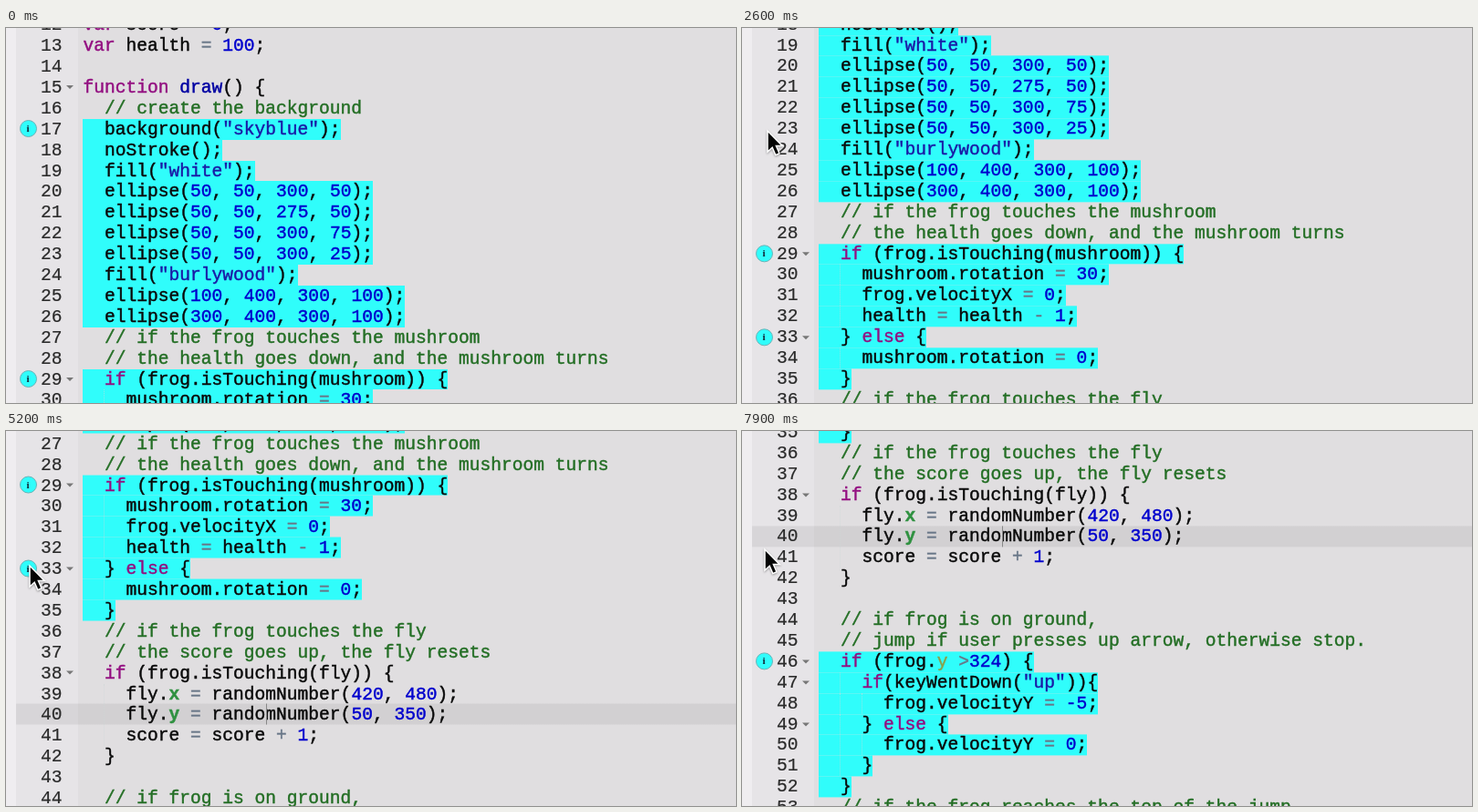
Recreate the animation shown at these times as an HTML page. Size 800 px wide and 412 px high, loop 8000 ms.

```html
<!DOCTYPE html>
<html lang="en">
<head>
<meta charset="utf-8">
<title>Code walkthrough</title>
<style>
html, body { margin: 0; width: 100%; height: 100%; overflow: hidden; }
#stage { position: relative; width: 800px; height: 412px; overflow: hidden;
  background: linear-gradient(90deg, #efedf0 11px, #e6e4e7 11px 79px, #e0dee0 79px);
  font: 19.6px "Liberation Mono", monospace; color: #0a0a0a; white-space: pre; }
#doc, #tip, #cursor { position: absolute; left: 0; top: 0; }
.row { position: absolute; left: 11px; width: 789px; height: 22.9px; line-height: 24.9px; }
.row > * { position: absolute; top: 0; }
.active { background: linear-gradient(90deg, #d7d5d8 68px, #d2d0d2 68px); }
.num { right: 738.5px; color: #2a2a2a; -webkit-text-stroke: .2px; }
.code { left: 73.4px; height: 22.95px; -webkit-text-stroke: .45px; }
.hl { background: #30fdfb; }
.fold { left: 55px; top: 9.5px; border: 4px solid transparent; border-top: 4.5px solid #777; border-bottom: 0; }
.info { left: 3.5px; top: 1.5px; width: 17px; height: 17px; border: 1px solid #68b4b8; border-radius: 50%;
  background: #30fdfb; font: bold 11px/17px "Liberation Serif", serif; text-align: center; color: #123; }
.guide { width: 0; height: 22.9px; border-left: 1px dotted rgba(205, 215, 215, .6); }
.caret { left: 274px; width: 1px; height: 22.9px; background: #888; }
.k { color: #930f80; } .n { color: #0000cd; } .s { color: #1a1aa6; } .c { color: #236e24; }
.o { color: #687687; } .f { color: #0000a2; } .p { color: #2f9140; font-weight: bold; }
.hl .p { color: #8aa04a; font-weight: normal; }
#tip { box-sizing: border-box; height: 40px; padding: 0 9px 0 41px; border-radius: 7px; background: #2b2a30;
  box-shadow: 0 1px 5px rgba(0, 0, 0, .45); color: #fff; line-height: 42px; -webkit-text-stroke: .35px; }
#tip::before { content: ""; position: absolute; left: 8px; top: 9px; width: 22px; height: 22px;
  border-radius: 50%; background: #e6f3f4; }
#cursor { overflow: visible; filter: drop-shadow(0 1px 1px rgba(0, 0, 0, .35)); }
</style>
</head>
<body>
<div id="stage">
  <div id="doc"></div>
  <div id="tip"></div>
  <svg id="cursor" width="20" height="30">
    <path d="M0 0V23L5.2 18.2L8.8 26.6L13 24.8L9.4 16.6H16.4Z" fill="#050505" stroke="#fff" stroke-width="1.5"/>
  </svg>
</div>
<script>
const firstLine = 12, rowHeight = 22.9, charWidth = 11.76, loop = 8000;
const source = `var score = 0;
var health = 100;

function draw() {
  // create the background
  background("skyblue");
  noStroke();
  fill("white");
  ellipse(50, 50, 300, 50);
  ellipse(50, 50, 275, 50);
  ellipse(50, 50, 300, 75);
  ellipse(50, 50, 300, 25);
  fill("burlywood");
  ellipse(100, 400, 300, 100);
  ellipse(300, 400, 300, 100);
  // if the frog touches the mushroom
  // the health goes down, and the mushroom turns
  if (frog.isTouching(mushroom)) {
    mushroom.rotation = 30;
    frog.velocityX = 0;
    health = health - 1;
  } else {
    mushroom.rotation = 0;
  }
  // if the frog touches the fly
  // the score goes up, the fly resets
  if (frog.isTouching(fly)) {
    fly.x = randomNumber(420, 480);
    fly.y = randomNumber(50, 350);
    score = score + 1;
  }

  // if frog is on ground,
  // jump if user presses up arrow, otherwise stop.
  if (frog.y >324) {
    if(keyWentDown("up")){
      frog.velocityY = -5;
    } else {
      frog.velocityY = 0;
    }
  }
  // if the frog reaches the top of the jump`;

const token = /(?<c>\/\/.*)|(?<s>".*?")|(?<k>\b(?:var|function|if|else)\b)|(?<f>\bdraw\b)|(?<n>-?\b\d+)|(?<p>(?<=\.)[xy]\b)|(?<o>[-=+>])/g;
const paint = text => text.replace(token, (match, ...rest) => {
  const groups = rest.at(-1);
  const kind = Object.keys(groups).find(key => groups[key] !== undefined);
  return `<span class="${kind}">${match.replace(">", "&gt;")}</span>`;
});

const $ = id => document.getElementById(id);
const highlighted = n => [[17, 26], [29, 35], [46, 52]].some(([a, b]) => n >= a && n <= b);

$("doc").innerHTML = source.split("\n").map((text, i) => {
  const n = firstLine + i, indent = text.search(/\S/);
  let extra = "";
  for (let col = 2; col < indent; col += 2)
    extra += `<i class="guide" style="left:${72.5 + col * charWidth}px"></i>`;
  if (text.endsWith("{")) extra += '<i class="fold"></i>';
  if ([17, 29, 33, 46].includes(n)) extra += '<span class="info">i</span>';
  if (n === 40) extra += '<i class="caret"></i>';
  return `<div class="row ${n === 40 ? "active" : ""}" style="top:${99.7 + (n - 17) * rowHeight}px">` +
    `<span class="num">${n}</span><span class="code ${highlighted(n) ? "hl" : ""}">${paint(text)}</span>${extra}</div>`;
}).join("");

// Moves: start, end, then the values reached at the end
const scrolls = [[2200, 3310, 233], [4800, 5500, 347.5], [7300, 7900, 521.6]];
const moves = [[500, 900, 22, 112], [2000, 2400, 28, 113], [2900, 3600, 26, 148], [5700, 6100, 25, 130]];
const tips = [
  [1000, 2100, 41, 133, "The background is drawn."],
  [4000, 4800, 45, 168, "Sprite interactions are handled."],
  [6200, 7300, 45, 152, "The sprites are drawn and the score and health are displayed."]
];

const easeOut = u => 1 - (1 - u) ** 2;
function follow(track, t, ...value) {
  for (const [start, end, ...goal] of track) {
    const u = easeOut(Math.min(1, Math.max(0, (t - start) / (end - start))));
    value = value.map((v, i) => v + (goal[i] - v) * u);
  }
  return value;
}
const place = (id, x, y) => $(id).style.transform = `translate(${x}px, ${y}px)`;

function draw(now) {
  const t = Math.floor(now % loop / 100) * 100;
  place("doc", 0, -follow(scrolls, t, 0)[0]);
  place("cursor", ...follow(moves, t, 50, 420));
  const tip = tips.find(([start, end]) => t >= start && t < end);
  $("tip").hidden = !tip;
  if (tip) {
    place("tip", tip[2], tip[3]);
    $("tip").textContent = tip[4];
  }
  requestAnimationFrame(draw);
}
draw(performance.now());
</script>
</body>
</html>
```
